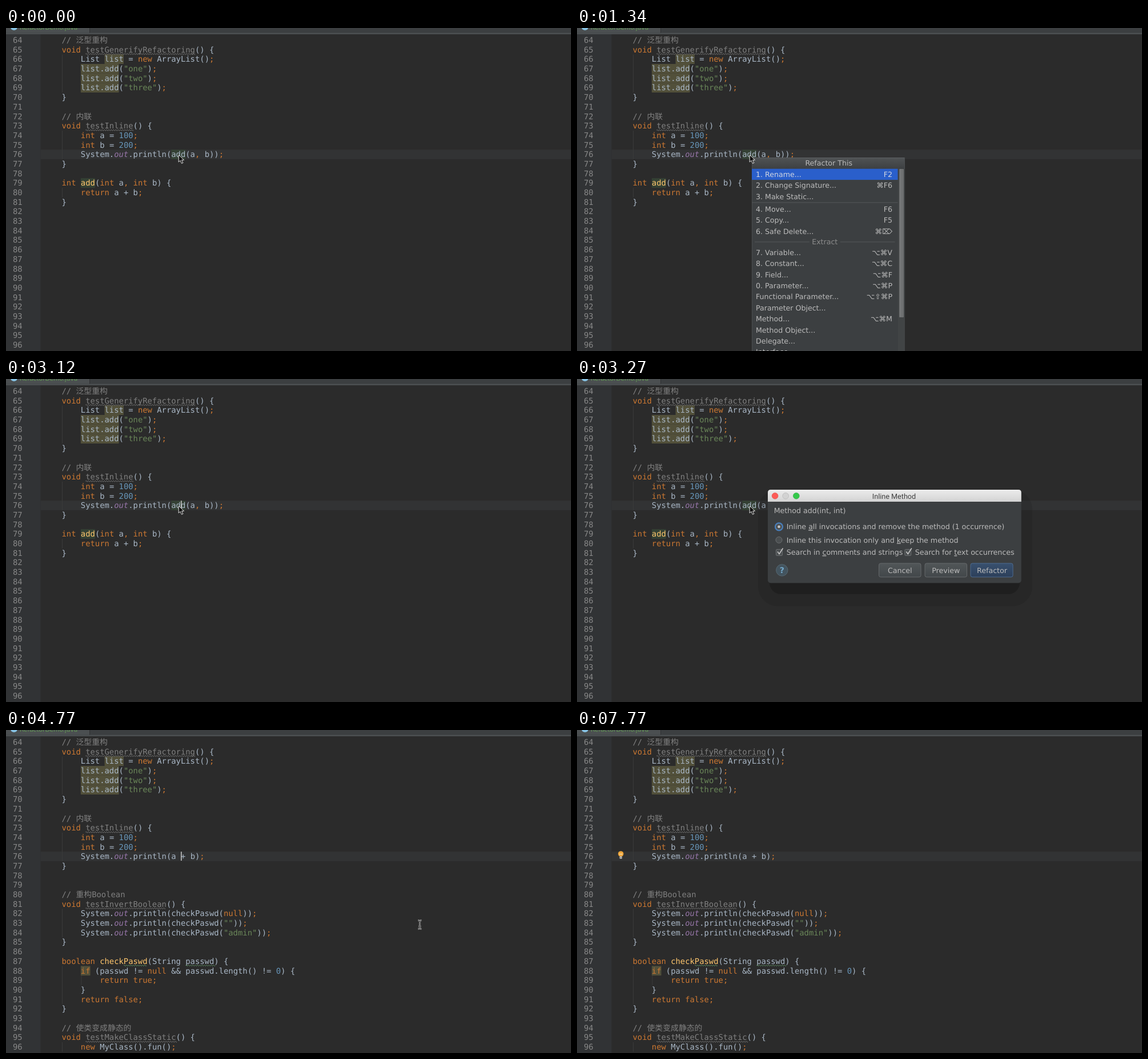
These frames come from a looping animation (989 px wide and 566 px high, 7870 ms). An HTML page:

```html
<!DOCTYPE html>
<html lang="en">
<head>
<meta charset="utf-8">
<title>Inline method</title>
<style>
html, body { margin: 0; width: 100%; height: 100%; overflow: hidden; background: #2b2b2b; }
svg { display: block; }
text { white-space: pre; text-rendering: geometricPrecision; }
.code { font: 13.85px "DejaVu Sans Mono", "Noto Sans CJK SC", "Noto Sans CJK", monospace; fill: #a9b7c6; }
.ui { font: 12.6px "DejaVu Sans", sans-serif; fill: #bbb; }
.number { fill: #888; }
.kw { fill: #cc7832; }
.str { fill: #6a8759; }
.num { fill: #6897bb; }
.com, .unused { fill: #808080; }
.decl { fill: #ffc66d; }
.field { fill: #9876aa; font-style: italic; }
.key { text-decoration: underline; }
</style>
</head>
<body>
<svg id="stage" width="989" height="566" viewBox="0 0 989 566"></svg>
<script>
const LOOP = 7870;
const FIRST = 64, PITCH = 16.69, TOP = 12.9, LEFT = 97.5, CELL = 8.338;

const rowTop = n => TOP + (n - FIRST) * PITCH;
const colX = c => LEFT + c * CELL;
const escapeText = s => s.replace(/&/g, '&amp;').replace(/</g, '&lt;');
const rect = (x, y, w, h, fill, extra = '') =>
  `<rect x="${x}" y="${y}" width="${w}" height="${h}" fill="${fill}" ${extra}/>`;
const line = (x1, y1, x2, y2, color) =>
  `<path d="M${x1} ${y1}L${x2} ${y2}" stroke="${color}"/>`;
const circle = (x, y, r, fill, extra = '') =>
  `<circle cx="${x}" cy="${y}" r="${r}" fill="${fill}" ${extra}/>`;
const label = (x, y, s, extra = '') => `<text class="ui" x="${x}" y="${y + 4.4}" ${extra}>${s}</text>`;
const group = (id, content) => `<g id="${id}">${content}</g>`;

// Code editor
const shared = `// 泛型重构
void testGenerifyRefactoring() {
    List list = new ArrayList();
    list.add("one");
    list.add("two");
    list.add("three");
}

// 内联
void testInline() {
    int a = 100;
    int b = 200;`;

const before = `    System.out.println(add(a, b));
}

int add(int a, int b) {
    return a + b;
}`;

const after = `    System.out.println(a + b);
}


// 重构Boolean
void testInvertBoolean() {
    System.out.println(checkPaswd(null));
    System.out.println(checkPaswd(""));
    System.out.println(checkPaswd("admin"));
}

boolean checkPaswd(String passwd) {
    if (passwd != null && passwd.length() != 0) {
        return true;
    }
    return false;
}

// 使类变成静态的
void testMakeClassStatic() {
    new MyClass().fun();
}`;

const TOKEN = /\/\/.*|"[^"]*"|\w+|[;,]|\s+|./g;
const KEYWORD = /^(void|int|boolean|new|return|if|null|true|false|[;,])$/;

function tokenClass(token, source, index) {
  if (token.startsWith('//')) return 'com';
  if (token[0] === '"') return 'str';
  if (KEYWORD.test(token)) return 'kw';
  if (/^\d/.test(token)) return 'num';
  if (token === 'out') return 'field';
  if (token.startsWith('test')) return 'unused';
  if (/^(int|boolean) $/.test(source.slice(0, index)) && source[index + token.length] === '(') return 'decl';
  return '';
}

function codeLine(source, n) {
  const spans = source.replace(TOKEN, (token, index) =>
    `<tspan class="${tokenClass(token, source, index)}">${escapeText(token)}</tspan>`);
  return `<text class="code" x="${LEFT}" y="${rowTop(n) + 13.1}">${spans}</text>`;
}
const codeBlock = (source, start) => source.split('\n').map((s, i) => codeLine(s, start + i)).join('');

const WARN = '#52503a', USAGE = '#344134';
const mark = (n, col, len, color) => rect(colX(col), rowTop(n), len * CELL, PITCH, color);

function wave(n, col, len, color) {
  const count = Math.round(len * CELL / 4);
  return `<path d="M${colX(col)} ${rowTop(n) + 16}${'q1 -1.8 2 0t2 0'.repeat(count)}" fill="none" stroke="${color}" stroke-width=".9"/>`;
}
const grayWave = (n, len) => wave(n, 5, len, '#808080');
const typo = (n, col, len) => wave(n, col, len, '#659c6b');
const guide = (from, to, col = 0) =>
  line(colX(col) + 1, rowTop(from), colX(col) + 1, rowTop(to + 1), '#3a3a3a');

function editor() {
  let numbers = '';
  for (let n = FIRST; n <= 97; n++)
    numbers += `<text class="code number" x="28.7" y="${rowTop(n) + 13.1}" text-anchor="end">${n}</text>`;
  return rect(0, 0, 989, 566, '#2b2b2b') + rect(0, 11, 60.5, 555, '#313335') +
    rect(60.5, rowTop(76), 929, PITCH, '#323334') + numbers +
    rect(0, 0, 989, 11, '#3c3f41') + rect(0, 0, 146, 8.5, '#4b4f51') +
    rect(0, 8.5, 989, 2.5, '#4b4f51') + rect(146, 0, 1, 8.5, '#303234') +
    circle(14, -2, 6, '#88c4e6') +
    '<text class="ui" x="24" y="2.5" style="font-size:10.6px;fill:#629755">RefactorDemo.java</text>' +
    guide(66, 69) + guide(74, 76) +
    mark(66, 9, 4, WARN) + [67, 68, 69].map(n => mark(n, 4, 8, WARN)).join('') +
    codeBlock(shared, 64) + grayWave(65, 23) + grayWave(73, 10);
}

const beforeView = () => guide(80, 80) + mark(76, 23, 3, USAGE) + mark(79, 4, 3, USAGE) + codeBlock(before, 76);

const afterView = () => guide(82, 84) + guide(88, 91) + guide(89, 89, 4) + guide(96, 96) +
  mark(88, 4, 2, WARN) + codeBlock(after, 76) +
  grayWave(81, 17) + grayWave(95, 19) + typo(87, 13, 5) + typo(87, 26, 6);

const bulb = () => circle(76.7, 217, 4.8, '#f0a63a') +
  '<path d="M75 219v-2.5l1.7 1.5 1.7-1.5v2.5" fill="none" stroke="#fbe3b0"/>' +
  rect(74.5, 221.5, 4.5, 4, '#c9c9c9', 'rx="1"') + line(74.5, 223.5, 79, 223.5, '#777');

// Popup menu: '-' is a separator, '#' starts a section title
const fullItems = ['1. Rename...|F2', '2. Change Signature...|⌘F6', '3. Make Static...', '-',
  '4. Move...|F6', '5. Copy...|F5', '6. Safe Delete...|⌘⌦', '#Extract',
  '7. Variable...|⌥⌘V', '8. Constant...|⌥⌘C', '9. Field...|⌥⌘F', '0. Parameter...|⌥⌘P',
  'Functional Parameter...|⌥⇧⌘P', 'Parameter Object...', 'Method...|⌥⌘M', 'Method Object...',
  'Delegate...', 'Interface...'];
const inItems = ['Interface...', '-', 'Inline...|⌥⌘N', 'Find and Replace Code Duplicates...',
  'Use Interface Where Possible...', 'Replace Inheritance with Delegation...'];
const iItems = ['2. Change Signature...|⌘F6', '3. Make Static...', '#Extract', '7. Variable...|⌥⌘V',
  '9. Field...|⌥⌘F', 'Functional Parameter...|⌥⇧⌘P', ...inItems,
  'Remove Middleman...', 'Wrap Method Return Value...'];

function menuRows(items, y, right, selected) {
  let out = '';
  for (const item of items) {
    if (item === '-') {
      out += line(306, y + 1, right, y + 1, '#55585a');
      y += 2.8;
    } else if (item[0] === '#') {
      const mid = (306 + right) / 2;
      out += line(311, y + 9, mid - 27, y + 9, '#55585a') + line(mid + 27, y + 9, right - 5, y + 9, '#55585a') +
        label(mid, y + 9, item.slice(1), 'text-anchor="middle" style="fill:#8c8c8c"');
      y += 17.6;
    } else {
      const [name, shortcut = ''] = item.split('|');
      const active = name === selected;
      if (active) out += rect(306, y, right - 306, 19.4, '#2a5fcb');
      const color = `style="fill:${active ? '#d0d6e2' : '#bbb'}"`;
      out += label(313, y + 9.9, name, color) +
        label(right - 9.5, y + 9.9, shortcut, `text-anchor="end" ${color}`);
      y += 19.4;
    }
  }
  return out;
}

const menuFrame = () => rect(306, 227, 268, 339, '#3c3f41') + rect(306, 227, 268, 19.5, 'url(#menuTitle)') +
  line(306, 227.5, 574, 227.5, '#5c5f61') + line(306.5, 227, 306.5, 566, '#4b4e50') +
  line(573.5, 227, 573.5, 566, '#4b4e50') + label(440.7, 236.6, 'Refactor This', 'text-anchor="middle"');

const fullMenu = () => menuRows(fullItems, 246.7, 561.5, '1. Rename...') +
  rect(562, 247, 12, 319, '#414445') + rect(564, 247, 8, 260, '#6d6f70', 'rx="1"') +
  group('thumbEdge', rect(565, 247, 3, 259, '#747677'));

const filteredMenu = (query, items) => menuRows(items, 268, 574, 'Inline...') +
  rect(306.5, 247, 266.5, 19.5, '#45494a', 'stroke="#676a6b"') +
  label(312.3, 256.2, query, 'style="font-size:10.8px"');

// Dialog
const key = c => `<tspan class="key">${c}</tspan>`;
const radio = (y, checked) => circle(353.5, y, 5.5, '#4b4f51', 'stroke="#6b6e70"') +
  (checked ? circle(353.5, y, 2.4, '#c4c4c4') : '');
const checkbox = x => rect(x, 298.5, 11, 11, '#4b4f51', 'rx="1.5" stroke="#6b6e70"') +
  `<path d="M${x + 2.5} 302.5l3 4 6.5-10" fill="none" stroke="#c2c2c2" stroke-width="1.6"/>`;
const button = (x, w, text) => rect(x, 323, w, 24, 'url(#button)', 'rx="3" stroke="#65686a"') +
  label(x + w / 2, 335.2, text, 'text-anchor="middle"');

function dialog() {
  return rect(317, 194, 480, 204, '#000', 'rx="34" opacity=".1"') +
    rect(337, 200, 438, 177, '#000', 'rx="20" opacity=".2"') +
    rect(334, 194, 443.7, 163.4, '#3c3f41', 'rx="5"') +
    '<path d="M334 215v-16q0-5 5-5h433.7q5 0 5 5V215z" fill="url(#dialogTitle)"/>' +
    circle(346.6, 204.8, 5.4, '#fc5b57', 'stroke="#e2463f" stroke-width=".6"') +
    circle(365.2, 204.8, 5.4, '#d2d2d2', 'stroke="#b9b9b9" stroke-width=".8"') +
    circle(383.8, 204.8, 5.4, '#34c84a', 'stroke="#28ab38" stroke-width=".6"') +
    '<text x="555" y="209.5" text-anchor="middle" fill="#404040" style="font:12.6px Roboto,sans-serif">Inline Method</text>' +
    label(344.7, 230.6, 'Method add(int, int)') +
    radio(258.9, true) + label(366.7, 259, `Inline ${key('a')}ll invocations and remove the method (1 occurrence)`) +
    radio(282, false) + label(366.7, 282.2, `Inline this invocation only and ${key('k')}eep the method`) +
    checkbox(348.5) + label(366.7, 303.8, `Search in ${key('c')}omments and strings`) +
    checkbox(573.8) + label(591.7, 303.8, `Search for ${key('t')}ext occurrences`) +
    circle(358.8, 335, 10.2, '#43545f', 'stroke="#566871"') +
    label(358.8, 335.2, '?', 'text-anchor="middle" style="font-size:14px;font-weight:bold;fill:#74a9cb"') +
    button(528.5, 73.5, 'Cancel') + button(609, 73.5, 'Preview') +
    rect(689, 323, 74, 24, 'url(#primary)', 'rx="3" stroke="#4c6a8f"') +
    group('radioFocus', circle(353.5, 258.9, 6.6, 'none', 'stroke="#467fbf" stroke-width="2"')) +
    group('buttonFocus', rect(688.6, 322.3, 74.4, 25, 'none', 'rx="3.5" stroke="#41699f" stroke-width="2"')) +
    label(726.5, 335.2, 'Refactor', 'text-anchor="middle"');
}

const arrow = '<path d="M0 0V12.6L3 9.9 5.2 15 7.6 14 5.4 9H9.4Z" fill="#111" stroke="#e4e4e4"/>';
const beamShape = 'M-3-7.5Q0-7.5 0-5Q0-7.5 3-7.5M0-5.5V5.5M-3 7.5Q0 7.5 0 5Q0 7.5 3 7.5M-2 3H2';
const beam = `<path d="${beamShape}" fill="none" stroke="#c8c8c8" stroke-width="2.3"/>` +
  `<path d="${beamShape}" fill="none" stroke="#222" stroke-width=".9"/>`;

const gradient = (id, a, b) => `<linearGradient id="${id}" x2="0" y2="1"><stop stop-color="${a}"/><stop offset="1" stop-color="${b}"/></linearGradient>`;

const stage = document.getElementById('stage');
stage.innerHTML = '<defs>' + gradient('menuTitle', '#505355', '#3d4042') +
  gradient('dialogTitle', '#ececec', '#d3d3d3') + gradient('button', '#515658', '#42474a') +
  gradient('primary', '#38506e', '#2c3f5a') + '</defs>' +
  editor() + group('before', beforeView()) + group('after', afterView()) +
  group('bulb', bulb()) + group('caret', rect(306, 213.2, 1.6, 15.8, '#c4c4c4')) +
  group('menu', menuFrame() + group('full', fullMenu()) + group('typedI', filteredMenu('i', iItems)) +
    group('typedIn', filteredMenu('in', inItems))) +
  group('dialog', dialog()) + group('arrow', arrow) + group('beam', beam);

const parts = Object.fromEntries([...stage.querySelectorAll('g[id]')].map(g => [g.id, g]));
const show = (id, visible) => parts[id].setAttribute('display', visible ? 'inline' : 'none');

const caretOn = [[290, 890], [3120, 3270], [4770, 6870], [7320, 7770]];
const pointer = [[0, 302.2, 222.3], [3720, 301.4, 222.3], [3870, 568.4, 270.4], [4020, 706.8, 315.4],
  [4170, 722.4, 335.4], [4320, 722.8, 335.4], [4620, 724.3, 341], [6870, 887.8, 440.7],
  [7020, 979.3, 496], [7170, 973, 541]];

function render(t) {
  const within = (from, to) => t >= from && t < to;
  show('before', t < 4770);
  show('after', t >= 4770);
  show('bulb', t >= 6720);
  show('caret', caretOn.some(([from, to]) => within(from, to)));
  show('menu', within(1340, 3120));
  show('full', t < 2230);
  show('thumbEdge', t < 1930);
  show('typedI', within(2230, 2520));
  show('typedIn', t >= 2520);
  show('dialog', within(3270, 4770));
  show('radioFocus', t < 4470);
  show('buttonFocus', t >= 4470);

  const [, x, y] = pointer.filter(([time]) => time <= t).pop();
  const shape = t < 4620 ? 'arrow' : 'beam';
  parts[shape].setAttribute('transform', `translate(${x} ${y})`);
  show('arrow', shape === 'arrow');
  show('beam', shape === 'beam' && t < 7320);
}

const start = performance.now();
function tick() {
  render((performance.now() - start) % LOOP);
  requestAnimationFrame(tick);
}
tick();
</script>
</body>
</html>
```
